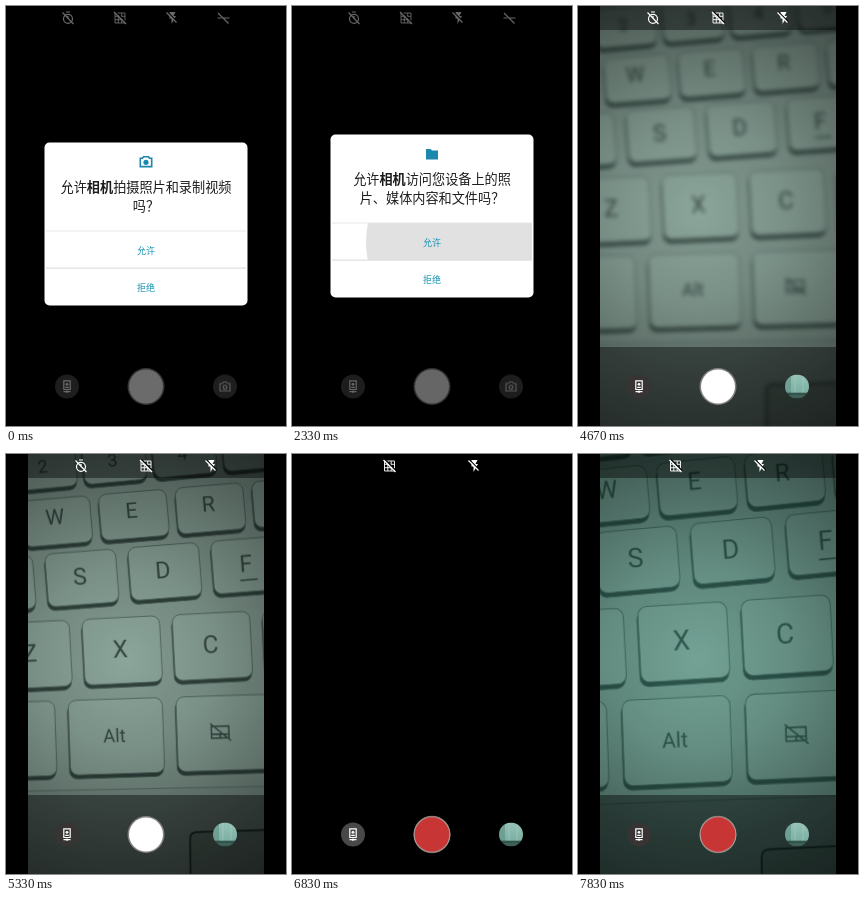
These frames come from a looping animation (280 px wide and 420 px high, 8000 ms). An HTML page:

```html
<!DOCTYPE html>
<html lang="zh-CN">
<head>
<meta charset="utf-8">
<title>Camera permissions</title>
<style>
  html, body { margin: 0; width: 100%; height: 100%; overflow: hidden; background: #000; }
  svg { display: block; width: 100%; height: 100%; }
  .line { fill: none; stroke: #fff; stroke-width: 1.2; }
  .thin { stroke-width: .9; }
  .gap { stroke: #000; stroke-width: 1.3; }
  .blue { fill: none; stroke: #1b86ae; stroke-width: 1.6; }
  .question { font: 13.15px "Noto Sans CJK SC", "Noto Sans CJK", sans-serif; fill: #1c1c1c; text-anchor: middle; }
  .question .app { font-weight: 700; }
  .button { font: 500 9px "Noto Sans CJK SC", "Noto Sans CJK", sans-serif; fill: #1593b4; text-anchor: middle; }
  .key text { font-family: Roboto, sans-serif; fill: #3a4843; text-anchor: middle; }
  .mark { fill: none; stroke: #3a4843; stroke-width: 1.5; }
</style>
</head>
<body>
<svg viewBox="0 0 280 420">
  <defs>
    <clipPath id="screen"><rect x="22" width="236" height="420"/></clipPath>
    <clipPath id="allowRow"><rect x="40" y="217" width="200" height="37"/></clipPath>
    <clipPath id="thumbClip"><circle r="12"/></clipPath>
    <radialGradient id="shade" gradientUnits="userSpaceOnUse" cx="120" cy="205" r="260">
      <stop offset="0" stop-opacity="0"/>
      <stop offset=".35" stop-opacity=".13"/>
      <stop offset="1" stop-opacity=".55"/>
    </radialGradient>
    <linearGradient id="thumbFill" x2="0" y2="1">
      <stop offset="0" stop-color="#96c2b7"/>
      <stop offset="1" stop-color="#75aa9d"/>
    </linearGradient>
    <g id="timer"><path class="line" d="M-2-6H2M0-2V1M-5.5-5.5L5.5 6"/><circle class="line" cy=".8" r="4.5"/></g>
    <g id="grid"><path class="line thin" d="M-5-5H5V5H-5ZM-1.7-5V5M1.7-5V5M-5-1.7H5M-5 1.7H5"/><path class="gap" d="M-4.5-6.5L6.5 4.5"/><path class="line" d="M-6-6L6 6"/></g>
    <g id="flash"><path fill="#fff" d="M-2.5-6H3.5L1.5-2H4L-.5 6V.5H-2.5Z"/><path class="gap" d="M-4.5-6L5.5 4"/><path class="line" d="M-5.5-5.5L4.5 4.5"/></g>
    <g id="hdr"><path class="line" d="M-6 0H-2M0 0H6M-5.5-5L5 5.5"/></g>
  </defs>

  <g clip-path="url(#screen)">
    <g id="preview">
      <rect width="280" height="420"/>
      <g id="blur"><g id="scene"></g></g>
      <rect id="tint" width="280" height="420" fill="#1a9c82"/>
      <rect width="280" height="420" fill="url(#shade)"/>
      <rect width="280" height="24" fill-opacity=".42"/>
      <rect y="341" width="280" height="79" fill-opacity=".42"/>
    </g>
  </g>

  <g id="iconsFour"></g>
  <g id="iconsThree"></g>
  <g id="iconsTwo"></g>

  <g transform="translate(61 380.5)">
    <circle id="switchDisc" r="12"/>
    <path class="line" d="M-3.2-5.6H3.2V3H-3.2ZM-3.5 5.2H3.5M0 4V6.4M-1.8.8H1.8"/>
    <circle cy="-2.2" r="1.4" fill="#fff"/>
  </g>
  <g transform="translate(140 380.5)">
    <circle r="18.5" fill="#808080"/>
    <circle r="17" fill="#fff"/>
    <g id="record"><circle r="18.3" fill="#a9aaa3"/><circle r="17.4" fill="#c83535"/></g>
  </g>
  <g transform="translate(219 380.5)">
    <g id="emptyThumb">
      <circle r="12" fill="#484848"/>
      <path class="line" stroke-opacity=".8" d="M-5-3H-2.5L-1.5-4.5H1.5L2.5-3H5V4.5H-5Z"/>
      <circle class="line" stroke-opacity=".8" cy=".7" r="1.9"/>
    </g>
    <g id="thumb" clip-path="url(#thumbClip)">
      <rect x="-12" y="-12" width="24" height="24" fill="url(#thumbFill)"/>
      <rect x="-12" y="-12" width="6" height="24" fill="#5f8f84" opacity=".6"/>
      <path d="M-2-12V8M6-12V8" stroke="#b3d5cb" stroke-width=".7" opacity=".6"/>
      <rect x="-12" y="6.5" width="24" height="2" fill="#1f3a34"/>
      <rect x="-12" y="8.5" width="24" height="4" fill="#3d6056"/>
    </g>
  </g>

  <rect id="dim" width="280" height="420"/>

  <g id="dialog">
    <rect x="38.5" y="128.5" width="203" height="163" rx="5" fill="#fff"/>
    <path id="ripple" clip-path="url(#allowRow)" fill="#e1e1e1" d="M165 145A91 91 0 0 0 165 327H260V145Z"/>
    <rect x="40" y="216.5" width="200" height="1" fill="#e8e8e8"/>
    <rect x="40" y="253.5" width="200" height="1.2" fill="#dedede"/>
    <text class="button" x="140" y="239.5">允许</text>
    <text class="button" x="140" y="276.7">拒绝</text>
    <g id="askCamera" class="question">
      <path class="blue" d="M134.3 144.2H136.5L137.5 142.8H142.5L143.5 144.2H145.7V152.6H134.3Z"/>
      <circle cx="140" cy="148.3" r="2.6" fill="#1b86ae"/>
      <text x="140" y="178">允许<tspan class="app">相机</tspan>拍摄照片和录制视频</text>
      <text x="140" y="197">吗？</text>
    </g>
    <g id="askMic" class="question">
      <rect x="138" y="142" width="4" height="8" rx="2" fill="#2389bd"/>
      <path class="blue" stroke-width="1.2" d="M135.6 147.5A4.4 4.4 0 0 0 144.4 147.5M140 152V155"/>
      <text x="140" y="178">允许<tspan class="app">相机</tspan>录音吗？</text>
    </g>
    <g id="askFiles" class="question">
      <path fill="#1b86ae" d="M134 143H138.5L140 144.5H146V153.5H134Z"/>
      <text x="140" y="178">允许<tspan class="app">相机</tspan>访问您设备上的照</text>
      <text x="140" y="197">片、媒体内容和文件吗？</text>
    </g>
  </g>
</svg>

<script>
const LOOP = 8000;
const byId = id => document.getElementById(id);
const timeOf = step => Math.round(step * 50 / 3) * 10;   // six pictures a second

// Hold each value until the next listed step.
function hold(id, table) {
  const frames = Object.entries(table).map(([step, props]) =>
    ({ ...props, offset: timeOf(+step) / LOOP, easing: 'step-end' }));
  frames.push({ ...frames[frames.length - 1], offset: 1 });
  byId(id).animate(frames, { duration: LOOP, iterations: Infinity });
}

function fade(id, table) {
  hold(id, Object.fromEntries(
    Object.entries(table).map(([step, opacity]) => [step, { opacity }])));
}

function addIcons(id, icons) {
  byId(id).innerHTML = icons.map(([name, x]) =>
    `<use href="#${name}" x="${x}" y="12"/>`).join('');
}

addIcons('iconsFour', [['timer', 62], ['grid', 114], ['flash', 166], ['hdr', 217.5]]);
addIcons('iconsThree', [['timer', 75], ['grid', 140], ['flash', 205]]);
addIcons('iconsTwo', [['grid', 97.5], ['flash', 182]]);

// Keyboard rows: first key centre, step to the next key, key size, label lift.
const rows = [
  { x: -42, y: 15, dx: 72, dy: -7, w: 65, h: 41, lift: 2, font: 18, keys: ['', '2', '3', '4', '5'] },
  { x: -36, y: 69, dx: 79, dy: -7, w: 70, h: 47, lift: 5, font: 22, keys: ['', 'W', 'E', 'R', ''] },
  { x: -17, y: 126.5, dx: 85.5, dy: -7, w: 73, h: 54, lift: 2, font: 24, keys: ['', 'S', 'D', 'F'] },
  { x: 17, y: 198, dx: 93, dy: -5, w: 80, h: 67, lift: 2, font: 25, keys: ['Z', 'X', 'C', ''] },
  { x: -7, y: 284.5, dx: 111, dy: -4, w: 97, h: 76, lift: 1, font: 19, keys: ['', 'Alt', 'pad'] }
];

function keyLabel(label, font, lift) {
  if (label === 'pad')
    return '<path class="mark" d="M-13-7H5V5H-13ZM-13 1H5M-4 1V5M-14-10L7 8"/>';
  const bump = label === 'F' ? '<path class="mark" d="M-9 15H9"/>' : '';
  return `<text x="-2" y="${font * .36 - lift}" font-size="${font}">${label}</text>${bump}`;
}

function drawKey(row, label, i) {
  const { x, y, dx, dy, w, h, font, lift } = row;
  const box = `width="${w}" height="${h}" rx="8"`;
  const turn = Math.atan2(dy, dx) * 180 / Math.PI;
  return `<g class="key" transform="translate(${x + i * dx} ${y + i * dy}) rotate(${turn})">
    <rect x="${-w / 2 - 1}" y="${-h / 2 + 4}" ${box} fill="#33413c" stroke="#4d5d56"/>
    <rect x="${-w / 2}" y="${-h / 2}" ${box} fill="#90a69c" stroke="#53645d" stroke-width=".9"/>
    ${keyLabel(label, font, lift)}</g>`;
}

byId('scene').innerHTML = `
  <rect x="-60" y="-60" width="420" height="560" fill="#889c93"/>
  ${rows.map(row => row.keys.map((label, i) => drawKey(row, label, i)).join('')).join('')}
  <path d="M-40 338L320 329V480H-40Z" fill="#859890"/>
  <path d="M-40 338L320 329" stroke="#6a7b73" stroke-width="1.3"/>
  <path d="M181 480L180 384Q180 378 187 377.5L340 372V480Z" fill="#76887f" stroke="#26302c" stroke-width="1.8"/>`;

// The hand-held camera drifts between three poses.
const poses = [
  [28, [.94, .01, 0, .965, 19, 12.5]],
  [36, [1, 0, 0, 1, 0, 0]],
  [47, [1.112, -.011, 0, 1.128, -16.5, -28.5]]
];

function poseAt(step) {
  const [[k0, from], [k1, to]] = step < 36 ? poses : poses.slice(1);
  const p = Math.max(0, (step - k0) / (k1 - k0));
  return `matrix(${from.map((v, i) => v + (to[i] - v) * p)})`;
}

const drift = { 0: { transform: poseAt(28) } };
for (let step = 26; step < 48; step++)
  if (step !== 40) drift[step] = { transform: poseAt(step) };
hold('scene', drift);

hold('blur', {
  0: { filter: 'blur(2.4px)' }, 28: { filter: 'blur(2px)' }, 30: { filter: 'blur(1.2px)' },
  31: { filter: 'blur(.7px)' }, 32: { filter: 'blur(.4px)' }
});
fade('preview', { 0: 0, 26: .35, 27: .75, 28: 1, 41: 0, 42: .45, 43: .8, 44: 1 });
fade('tint', { 0: .03, 41: .24 });

fade('iconsFour', { 0: 1, 20: 0 });
fade('iconsThree', { 0: 0, 20: 1, 41: 0 });
fade('iconsTwo', { 0: 0, 41: 1 });
hold('switchDisc', {
  0: { fill: '#484848' }, 26: { fill: '#383434' }, 41: { fill: '#484848' }, 42: { fill: '#383434' }
});
fade('record', { 0: 0, 41: 1 });
fade('emptyThumb', { 0: 1, 22: 0 });
fade('thumb', { 0: 0, 22: 1 });

fade('dim', { 0: .58, 1: .59, 2: .6, 15: .25, 16: 0 });
hold('dialog', {
  0: { opacity: 1, transform: 'translateY(8px)' },
  1: { opacity: 1, transform: 'translateY(3px)' },
  2: { opacity: 1, transform: 'translateY(1px)' },
  3: { opacity: 1, transform: 'none' },
  15: { opacity: .4, transform: 'none' },
  16: { opacity: 0, transform: 'none' }
});
fade('ripple', { 0: 0, 5: 1, 6: .5, 7: 0, 9: 1, 10: .5, 11: 0, 14: 1, 15: .5, 16: 0 });
fade('askCamera', { 0: 1, 6: 0 });
fade('askMic', { 0: 0, 6: .5, 7: 1, 10: 0 });
fade('askFiles', { 0: 0, 10: .5, 11: 1 });
</script>
</body>
</html>
```
